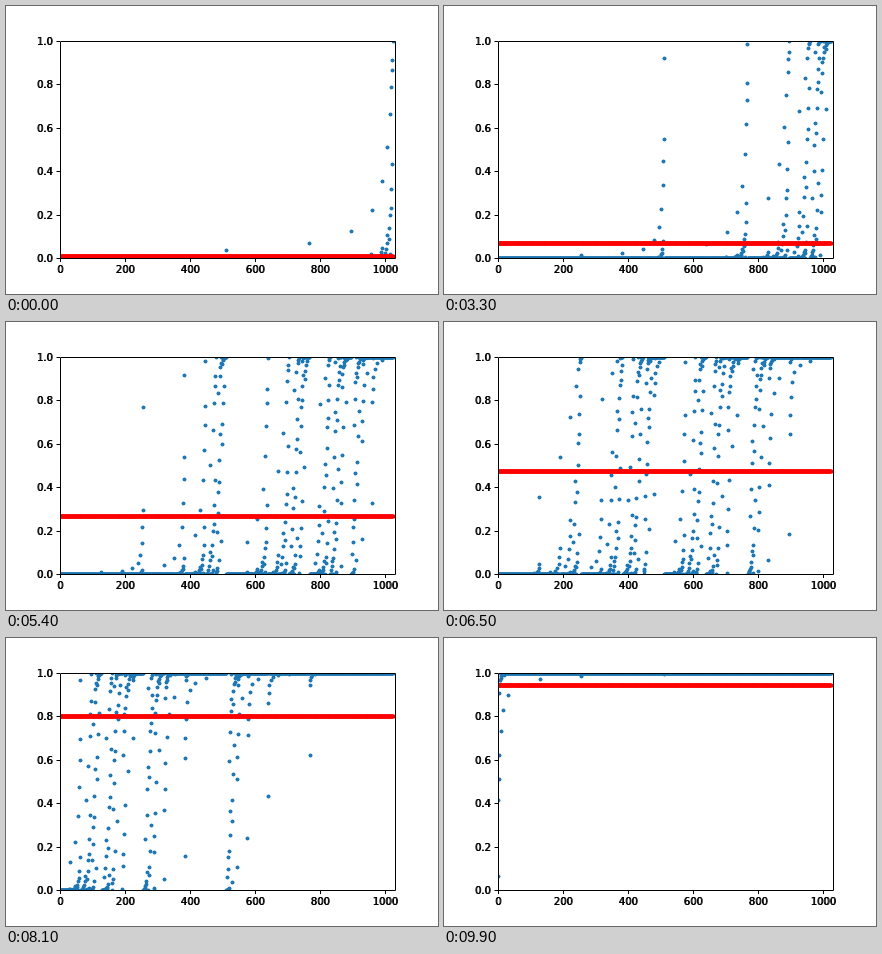
Animation, 432 px wide and 288 px high, one loop 10000 ms. Source, as an HTML page with a canvas:

```html
<!DOCTYPE html>
<html lang="en">
<head>
<meta charset="utf-8">
<title>Channel polarization</title>
<style>
html, body { margin: 0; width: 100%; height: 100%; overflow: hidden; background: #fff; }
canvas { display: block; }
</style>
</head>
<body>
<canvas id="plot" width="432" height="288"></canvas>
<script>
const ctx = document.getElementById('plot').getContext('2d');
const FRAMES = 100, FRAME_MS = 100, LEVELS = 10;
const LEFT = 54, RIGHT = 388.8, TOP = 34.56, BOTTOM = 252, X_MAX = 1030;
// Positions snap to pixel centres.
const px = x => Math.round(LEFT + (RIGHT - LEFT) * x / X_MAX) + 0.5;
const py = v => Math.round(BOTTOM - (BOTTOM - TOP) * v) + 0.5;

// A channel is a mixture of binary symmetric channels on a fixed grid of LLRs.
const BINS = 62, T0 = -5, STEP = 0.4;
const grid = Array.from({ length: BINS }, (_, i) => i ? Math.log1p(Math.exp(T0 + (i - 1) * STEP)) : 0);
const flip = L => 1 / (1 + Math.exp(L));
function entropy(L) {
  const p = flip(L);
  return -(p * Math.log(p) + (1 - p) * Math.log1p(-p)) / Math.LN2;
}
const H = grid.map(entropy);

// Lower bin and share of the upper one, keeping the capacity.
function locate(L) {
  const pos = Math.floor((Math.log(Math.expm1(L)) - T0) / STEP) + 1;
  const i = Math.max(0, Math.min(BINS - 2, pos));
  const share = (H[i] - entropy(L)) / (H[i] - H[i + 1]);
  return [i, Math.max(0, Math.min(1, share))];
}

// Per pair of bins: the check result, then the agreeing and disagreeing sums.
const binOf = new Uint8Array(BINS * BINS * 3);
const low = new Float64Array(binOf.length), high = new Float64Array(binOf.length);
for (let i = 0; i < BINS; i++) {
  for (let j = i; j < BINS; j++) {
    const a = flip(grid[i]), b = flip(grid[j]);
    const differ = a * (1 - b) + b * (1 - a);
    const count = i === j ? 1 : 2;
    [
      [Math.max(0, Math.log((1 - differ) / differ)), 1],
      [grid[i] + grid[j], 1 - differ],
      [grid[j] - grid[i], differ]
    ].forEach(([L, weight], c) => {
      const e = (i * BINS + j) * 3 + c;
      const [bin, share] = locate(L);
      binOf[e] = bin;
      high[e] = count * weight * share;
      low[e] = count * weight * (1 - share);
    });
  }
}

function gaussianChannel(db) {
  const mean = 2 * 10 ** (db / 10), sd = Math.sqrt(2 * mean);
  const mix = new Float64Array(BINS), dz = 0.02;
  for (let n = -300; n <= 300; n++) {
    const z = n * dz;
    const mass = Math.exp(-z * z / 2) * dz / Math.sqrt(2 * Math.PI);
    const [bin, share] = locate(Math.abs(mean + sd * z));
    mix[bin] += mass * (1 - share);
    mix[bin + 1] += mass * share;
  }
  return mix;
}

function split(mix) {
  const minus = new Float64Array(BINS), plus = new Float64Array(BINS);
  for (let i = 0; i < BINS; i++) {
    if (mix[i] < 1e-14) continue;
    for (let j = i; j < BINS; j++) {
      const mass = mix[i] * mix[j];
      if (mass < 1e-18) continue;
      const e = (i * BINS + j) * 3;
      let bin = binOf[e];
      minus[bin] += mass * low[e];
      minus[bin + 1] += mass * high[e];
      for (let c = e + 1; c < e + 3; c++) {
        bin = binOf[c];
        plus[bin] += mass * low[c];
        plus[bin + 1] += mass * high[c];
      }
    }
  }
  return [minus, plus];
}

function polarize(mix, level, out) {
  if (level === 0) {
    out.push(mix.reduce((sum, m, i) => sum + m * (1 - H[i]), 0));
  } else {
    for (const half of split(mix)) polarize(half, level - 1, out);
  }
  return out;
}

// Signal to noise ratio: nearly linear, sagging a little before the end.
function decibels(k) {
  const u = k / (FRAMES - 1);
  return -20 + 30 * u - 0.3 * u * (1 - u ** 8);
}

// Rate line: a smooth curve through a few points, in log-odds.
const rate = [[0, 0.0075], [16, 0.0212], [33, 0.067], [54, 0.269], [65, 0.4725], [81, 0.798], [99, 0.945]]
  .map(([k, v]) => [k, Math.log(v / (1 - v))]);
function slope(i) {
  const a = rate[Math.max(0, i - 1)], b = rate[Math.min(rate.length - 1, i + 1)];
  return (b[1] - a[1]) / (b[0] - a[0]);
}
function rateAt(k) {
  let i = 0;
  while (i < rate.length - 2 && k > rate[i + 1][0]) i++;
  const [k0, v0] = rate[i], [k1, v1] = rate[i + 1];
  const d = k1 - k0, u = (k - k0) / d, w = 1 - u;
  const y = w * w * (1 + 2 * u) * v0 + u * u * (3 - 2 * u) * v1
    + d * u * w * (w * slope(i) - u * slope(i + 1));
  return 1 / (1 + Math.exp(-y));
}

function drawAxes() {
  ctx.strokeStyle = ctx.fillStyle = '#000';
  ctx.lineWidth = 1;
  ctx.font = '10px "DejaVu Sans", sans-serif';
  ctx.beginPath();
  ctx.rect(54.5, 35.5, 335, 217);
  // Two close copies give the heavy, smeared labels.
  const label = (text, x, y) => {
    ctx.fillText(text, x - 0.4, y);
    ctx.fillText(text, x + 0.4, y);
  };
  for (let n = 0; n <= 5; n++) {
    const x = px(n * 200), y = py(n / 5);
    ctx.moveTo(x, 252);
    ctx.lineTo(x, 256);
    ctx.moveTo(50.5, y);
    ctx.lineTo(54, y);
    ctx.textAlign = 'center';
    label(String(n * 200), x, 267);
    ctx.textAlign = 'right';
    label((n / 5).toFixed(1), 47, y + 3.5);
  }
  ctx.stroke();
}

// Dots are filled one by one, so that rows of them build up a solid edge.
function drawDots(values, color) {
  ctx.fillStyle = color;
  values.forEach((v, i) => {
    ctx.beginPath();
    ctx.arc(px(i), py(v), 2, 0, 2 * Math.PI);
    ctx.fill();
  });
}

function draw(k, values) {
  ctx.fillStyle = '#fff';
  ctx.fillRect(0, 0, 432, 288);
  ctx.save();
  ctx.beginPath();
  ctx.rect(54, 35, 335, 217);
  ctx.clip();
  drawDots(values, '#1f77b4');
  drawDots(values.map(() => rateAt(k)), '#f00');
  ctx.restore();
  drawAxes();
}

const cache = [];
let shown = -1;
function tick() {
  const k = Math.floor(performance.now() / FRAME_MS) % FRAMES;
  if (k !== shown) {
    cache[k] ??= polarize(gaussianChannel(decibels(k)), LEVELS, []);
    draw(k, cache[k]);
    shown = k;
  }
  requestAnimationFrame(tick);
}
tick();
</script>
</body>
</html>
```
